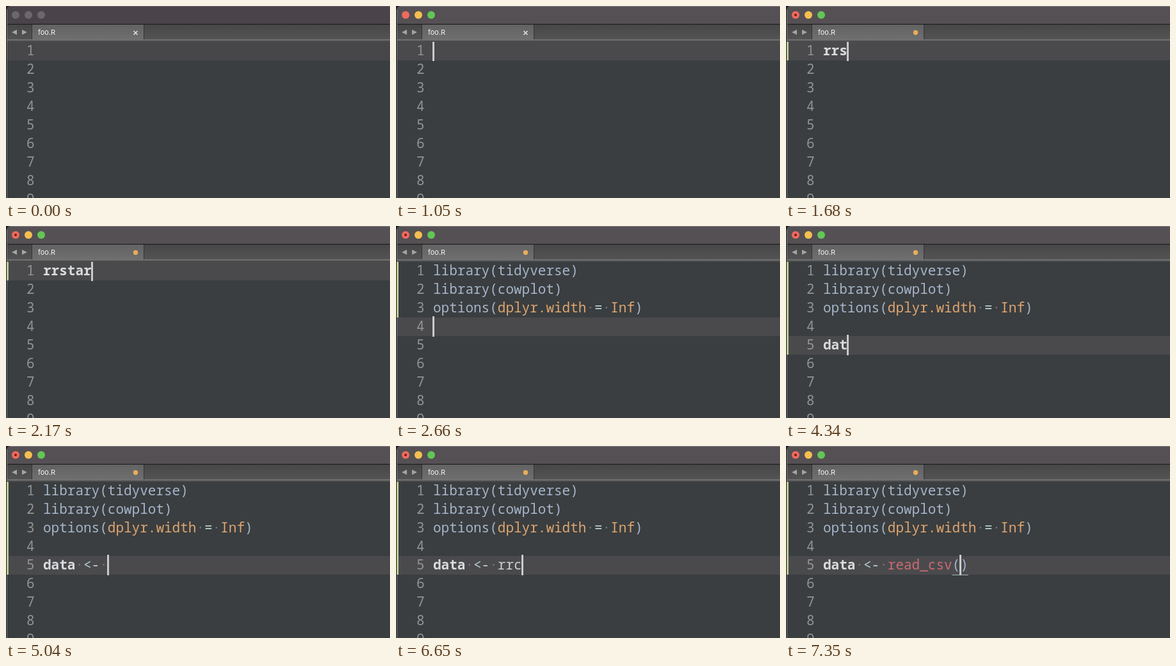
These frames come from a looping animation (600x300 px, 8000 ms). An HTML page with a canvas:

```html
<!DOCTYPE html>
<html lang="en">
<head>
<meta charset="utf-8">
<title>Snippet typing</title>
<style>
  html, body { margin: 0; width: 100%; height: 100%; overflow: hidden; background: #3a3e40; }
  canvas { display: block; width: 600px; height: 300px; }
</style>
</head>
<body>
<canvas id="stage" width="600" height="300"></canvas>
<script>
const ctx = document.getElementById('stage').getContext('2d');
const LOOP = 8000, FOCUS = 490, FIRST_EDIT = 1190;
const LEFT = 58, TOP = 56, ROW = 29, CHAR = 12.6;
const MONO = '21px "Noto Sans Mono", "DejaVu Sans Mono", monospace';
const COLORS = {
  code: '#a6b5ca', name: '#d9dbdd', plain: '#cbced0',
  arg: '#dfa56f', op: '#b8d0d0', call: '#c96b71', dot: '#707274'
};

// A line is a list of [style, text] pairs.
const HEADER = [
  [['code', 'library(tidyverse)']],
  [['code', 'library(cowplot)']],
  [['code', 'options('], ['arg', 'dplyr.width'], ['dot', '·'], ['op', '='],
   ['dot', '·'], ['arg', 'Inf'], ['code', ')']]
];
const ASSIGN = [['name', 'data'], ['dot', '·'], ['op', '<-'], ['dot', '·']];

const STATES = [];
function add(time, row, col, lines, marked) {
  STATES.push({ time, row, col, lines, marked });
}
function type(word, times, start, build, row, marked) {
  times.forEach((time, i) =>
    add(time, row, start + i + 1, build(word.slice(0, i + 1)), marked));
}
const withLast = line => [...HEADER, [], line];

add(0, 0, 0, [], 0);
type('rrstar', [FIRST_EDIT, 1540, 1680, 1960, 2100, 2170], 0, s => [[['name', s]]], 0, 1);
add(2660, 3, 0, HEADER, 3);
add(3080, 4, 0, HEADER, 5);
type('data', [4200, 4270, 4340, 4550], 0, s => withLast([['name', s]]), 4, 5);
add(4900, 4, 8, withLast(ASSIGN), 5);
type('rrcs', [6230, 6370, 6580, 6860], 8, s => withLast([...ASSIGN, ['plain', s]]), 4, 5);
add(7140, 4, 17, withLast([...ASSIGN, ['call', 'read_csv'], ['code', '()']]), 5);
STATES[STATES.length - 1].brackets = true;

function rect(color, x, y, w, h) {
  ctx.fillStyle = color;
  ctx.fillRect(x, y, w, h);
}
function circle(color, x, y, r) {
  ctx.fillStyle = color;
  ctx.beginPath();
  ctx.arc(x, y, r, 0, Math.PI * 2);
  ctx.fill();
}
function gradient(y0, y1, from, to) {
  const g = ctx.createLinearGradient(0, y0, 0, y1);
  g.addColorStop(0, from);
  g.addColorStop(1, to);
  return g;
}
function arrow(x, dir) {
  ctx.fillStyle = '#a5a5a5';
  ctx.beginPath();
  ctx.moveTo(x + dir * 4, 41);
  ctx.lineTo(x - dir * 4, 37);
  ctx.lineTo(x - dir * 4, 45);
  ctx.fill();
}

function drawWindow(active, edited) {
  rect(active ? '#545053' : '#4a444a', 0, 0, 600, 28);
  rect(active ? '#858184' : '#6a646a', 5, 0, 595, 1);
  const lights = active ? ['#ee6a5f', '#f5bf4f', '#62c656'] : Array(3).fill('#6b676b');
  lights.forEach((color, i) => circle(color, 15 + 20 * i, 14, 6));
  if (edited) circle('#7b1712', 15, 14, 2);

  rect('#171717', 0, 28, 600, 1);
  rect(gradient(29, 52, '#474747', '#535353'), 0, 29, 600, 23);
  rect(gradient(29, 54, '#626262', '#707070'), 41, 29, 174, 25);
  rect('#343434', 40, 29, 1, 23);
  rect('#343434', 215, 29, 1, 23);
  rect('#707070', 0, 52, 600, 2);
  rect('#4c4c4c', 0, 54, 600, 2);
  arrow(13, -1);
  arrow(29, 1);

  ctx.font = '11px Inter, Roboto, sans-serif';
  ctx.fillStyle = '#f4f4f4';
  ctx.fillText('foo.R', 50, 45);
  if (edited) {
    circle('#e9ad5a', 202.5, 41.5, 3.7);
  } else {
    ctx.strokeStyle = '#dedede';
    ctx.lineWidth = 1.7;
    ctx.beginPath();
    ctx.moveTo(199.5, 39); ctx.lineTo(205.5, 45);
    ctx.moveTo(205.5, 39); ctx.lineTo(199.5, 45);
    ctx.stroke();
  }
}

function drawEditor(state, active) {
  rect('#3a3e40', 0, TOP, 600, 300 - TOP);
  const top = TOP + state.row * ROW;
  rect(active ? '#4a4a4d' : '#474649', 0, top, 600, ROW);
  ctx.font = MONO;
  ctx.fillStyle = '#919394';
  for (let i = 0; i < 9; i++) ctx.fillText(i + 1, 32, 77 + i * ROW);

  state.lines.forEach((line, i) => {
    let col = 0;
    for (const [style, text] of line) {
      ctx.font = (style === 'name' ? '600 ' : '') + MONO;
      ctx.fillStyle = COLORS[style];
      ctx.fillText(text, LEFT + col * CHAR, 77 + i * ROW);
      col += text.length;
    }
  });

  const x = LEFT + state.col * CHAR;
  if (state.brackets) rect('#a6b5ba', x - CHAR, top + 29, CHAR * 2, 1);
  if (active) {
    const y = Math.max(TOP, top - 2);
    rect('#c9cbcb', Math.round(x - 1), y, 3, top + 30 - y);
  }
}

function drawEdge(marked) {
  rect('#202020', 0, 0, 1, 300);
  rect('#77777a', 1, 5, 1, 295);
  if (marked) rect('#bccb91', 1, TOP, 3, marked * ROW);
  // Rounded top-left window corner
  ctx.fillStyle = '#1c1b1f';
  ctx.beginPath();
  ctx.moveTo(0, 0);
  ctx.lineTo(7, 0);
  ctx.quadraticCurveTo(1, 0, 1, 7);
  ctx.lineTo(0, 7);
  ctx.fill();
}

function frame(now) {
  const t = now % LOOP;
  const state = STATES.filter(s => s.time <= t).pop() || STATES[0];
  const active = t >= FOCUS;
  drawWindow(active, t >= FIRST_EDIT);
  drawEditor(state, active);
  drawEdge(state.marked);
  requestAnimationFrame(loop);
}
let start;
function loop(now) {
  start ??= now;
  frame(Math.max(0, now - start));
}
loop(performance.now());
</script>
</body>
</html>
```
